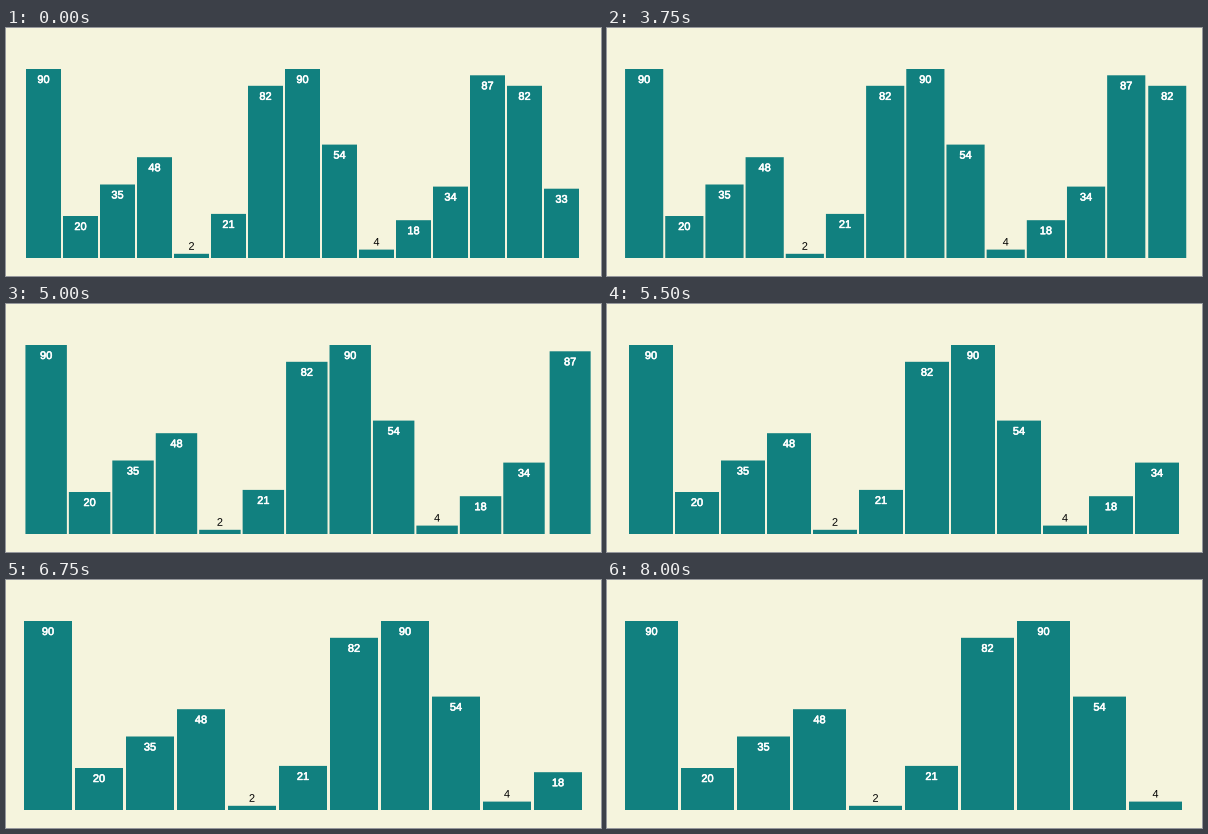
Animation of 595 by 248 pixels, one loop 9500 ms. Source, as a matplotlib script:

```python
import math

import matplotlib.pyplot as plt
from matplotlib.animation import FuncAnimation
from matplotlib.patches import Rectangle
from matplotlib.patheffects import Normal, withStroke

W, H, DPI = 595, 248, 100
BEIGE, TEAL = "#f5f4dd", "#11807f"

VALUES = [90, 20, 35, 48, 2, 21, 82, 90, 54, 4, 18, 34, 87, 82, 33]
LEFT, SPAN, PADDING = 14, 566, 0.05
BASE, UNIT = 230, 2.1
EXIT_X = 594

STEP, LOOP = 250, 9500
REMOVALS = [2538, 3628, 4834, 6015, 7252]
DURATION = 500


def layout(n):
    """Left edge, pitch and bar width of n rounded bands."""
    pitch = math.floor(SPAN / (n + PADDING))
    margin = math.floor((SPAN - (n - PADDING) * pitch) / 2 + 0.5)
    return LEFT + margin, pitch, round(pitch * (1 - PADDING))


def ease(t):
    """Cubic in and out."""
    return 4 * t**3 if t < 0.5 else 1 - 4 * (1 - t) ** 3


def mix(a, b, p):
    return a + (b - a) * p


def bars_at(ms):
    """Left edge and width of every bar still on the stage."""
    done = sum(ms >= s + DURATION for s in REMOVALS)
    n = len(VALUES) - done
    x0, pitch, width = layout(n)
    bars = [(x0 + i * pitch, width) for i in range(n)]
    if done == len(REMOVALS) or ms <= REMOVALS[done]:
        return bars

    p = ease((ms - REMOVALS[done]) / DURATION)
    x1, next_pitch, next_width = layout(n - 1)
    moved = [
        (mix(x, x1 + i * next_pitch, p), mix(w, next_width, p))
        for i, (x, w) in enumerate(bars[:-1])
    ]
    x, w = bars[-1]
    return moved + [(mix(x, EXIT_X, p), w)]


plt.rcParams["font.family"] = "Liberation Sans"
plt.rcParams["text.hinting"] = "none"

fig = plt.figure(figsize=(W / DPI, H / DPI), dpi=DPI, facecolor=BEIGE)
ax = fig.add_axes([0, 0, 1, 1])
ax.set_xlim(0, W)
ax.set_ylim(H, 0)
ax.axis("off")


def make_bar(value):
    top = BASE - value * UNIT
    rect = Rectangle((0, top), 1, BASE - top, facecolor=TEAL, linewidth=0)
    rect.set_snap(False)
    ax.add_patch(rect)

    inside = value > 10
    color = "white" if inside else "black"
    label = ax.text(
        0, top + 14 if inside else top - 4, str(value), color=color,
        fontsize=11 * 72 / DPI, ha="center", va="baseline", clip_on=True,
    )
    # Light text on the bars is drawn slightly heavier.
    effect = withStroke(linewidth=0.4, foreground=color) if inside else Normal()
    label.set_path_effects([effect])
    return rect, label


parts = [make_bar(v) for v in VALUES]


def draw(frame):
    bars = bars_at(frame * STEP)
    for i, (rect, label) in enumerate(parts):
        shown = i < len(bars)
        rect.set_visible(shown)
        label.set_visible(shown)
        if shown:
            x, width = bars[i]
            rect.set_x(x)
            rect.set_width(width)
            label.set_x(x + width / 2)
    return [artist for pair in parts for artist in pair]


anim = FuncAnimation(
    fig, draw, frames=LOOP // STEP, interval=STEP, repeat=True, repeat_delay=0
)
plt.show()
```
